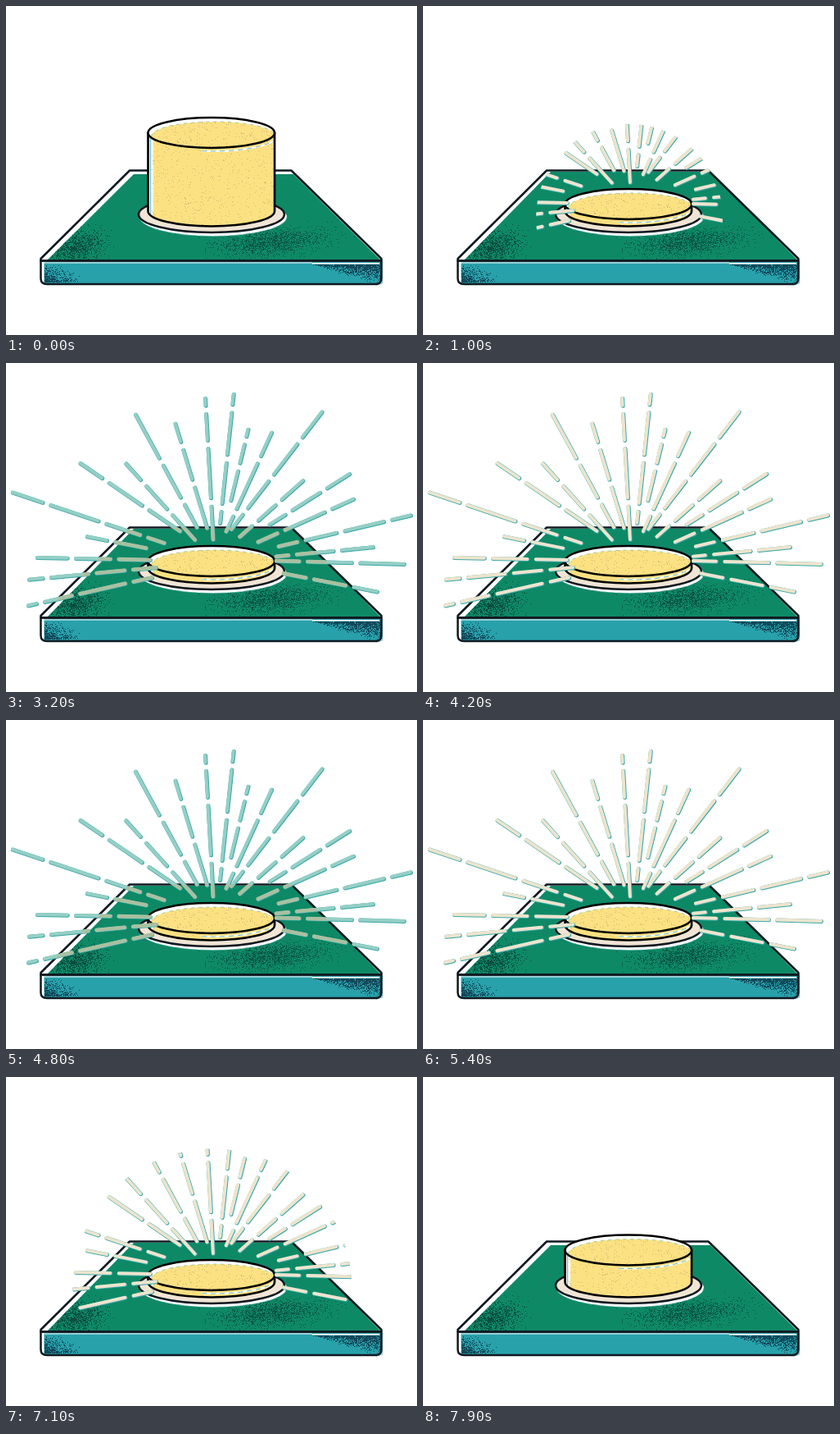
An HTML page with a canvas that plays this animation: 502 px wide and 401 px high, repeating every 8000 ms.

```html
<!DOCTYPE html>
<html lang="en">
<head>
<meta charset="utf-8">
<title>Push button</title>
<style>
html, body { margin: 0; width: 100%; height: 100%; overflow: hidden; background: #fff; }
canvas { display: block; width: 502px; height: 401px; }
</style>
</head>
<body>
<canvas id="stage" width="502" height="401"></canvas>
<script>
const ctx = document.getElementById('stage').getContext('2d');
const LOOP = 8000, UP = 154.5, DOWN = 241.5;
const INK = '#101820', GREEN = '#0e8966', TEAL = '#28a1ab', YELLOW = '#fbe182', CREAM = '#ede4cd';
const TAU = Math.PI * 2;

// outer x, y, inner x, y, then gap centres in percent from the outer end
const RAYS = [
  [6, 157, 195, 220, 23, 59, 86], [97, 211, 173, 226, 41], [36, 237, 178, 240, 31, 68],
  [26, 264, 185, 249, 15, 50, 78], [25, 296, 180, 261, 11, 39, 81], [89, 121, 214, 206, 26, 65],
  [145, 121, 232, 217, 26, 63], [157, 61, 234, 202, 42, 76], [206, 72, 246, 203, 22, 57],
  [243, 41, 253, 217, 9, 33, 73], [278, 36, 261, 197, 12, 50, 87], [296, 79, 274, 169, 17, 53],
  [325, 83, 268, 207, 28, 80], [387, 58, 274, 204, 25, 56, 84], [364, 142, 284, 213, 39, 75],
  [421, 134, 320, 198, 33, 75], [426, 165, 306, 219, 27, 75], [496, 185, 331, 224, 18, 53, 82],
  [450, 224, 328, 236, 37, 82], [488, 245, 328, 241, 38, 78], [455, 279, 337, 256, 30, 71]
];

let seed = 17;
function rnd() {
  seed = (seed * 16807) % 2147483647;
  return seed / 2147483647;
}
const bell = () => (rnd() + rnd() + rnd() + rnd() - 2) * 1.7;

function dots(n, place, size = 1) {
  const p = new Path2D();
  for (let i = 0; i < n; i++) {
    const [x, y] = place();
    p.rect(Math.round(x), Math.round(y), size, size);
  }
  return p;
}
const blob = (x, y, sx, sy, tilt = 0) => () => {
  const dx = bell() * sx;
  return [x + dx, y + bell() * sy + dx * tilt];
};

const shadeLeft = dots(1100, blob(84, 292, 17, 9, -0.15));
const shadeRight = dots(1500, blob(324, 287, 33, 8, -0.08));
const shadeRim = dots(170, () => {
  const a = rnd() * TAU, r = 1.05 + rnd() * 0.15;
  return [251 + Math.cos(a) * 92 * r, 252 + Math.sin(a) * 26 * r];
});
const shadeFrontRight = dots(1150, () => {
  const u = Math.sqrt(rnd());
  return [374 + u * 83, 315 + rnd() * rnd() * 26 * u];
});
const shadeFrontLeft = dots(420, () => [47 + rnd() * rnd() * 42, 336 - rnd() * rnd() * 22]);
const grain = dots(720, () => [177 + rnd() * 150, 134 + rnd() * 134]);

function poly(...pts) {
  const p = new Path2D();
  for (let i = 0; i < pts.length; i += 2) p.lineTo(pts[i], pts[i + 1]);
  p.closePath();
  return p;
}
function oval(x, y, rx, ry, a = 0, b = TAU) {
  const p = new Path2D();
  p.ellipse(x, y, rx, ry, 0, a, b);
  return p;
}
function fill(p, color) {
  ctx.fillStyle = color;
  ctx.fill(p);
}
function stroke(p, color, w) {
  ctx.strokeStyle = color;
  ctx.lineWidth = w;
  ctx.stroke(p);
}
function inside(p, draw) {
  ctx.save();
  ctx.clip(p);
  draw();
  ctx.restore();
}
function dashed(p, color, w, dash) {
  ctx.setLineDash(dash);
  stroke(p, color, w);
  ctx.setLineDash([]);
}

const outline = poly(151, 200.5, 348.5, 200.5, 458.5, 308, 458.5, 310.5, 42.5, 310.5, 42.5, 308);
const front = new Path2D();
front.moveTo(42.5, 310.5);
front.lineTo(458.5, 310.5);
front.lineTo(458.5, 332);
front.quadraticCurveTo(458.5, 339, 451, 339);
front.lineTo(50, 339);
front.quadraticCurveTo(42.5, 339, 42.5, 332);
front.closePath();

function drawBoard(pressed) {
  const y = pressed ? 202 : 205;
  const face = poly(156, y, 351, y, 458, 310, 50, 310);
  fill(outline, '#fff');
  fill(face, GREEN);
  inside(face, () => {
    fill(shadeLeft, '#0a4d3f');
    fill(shadeRight, '#0a5544');
    fill(shadeRim, '#2a7568');
  });
  fill(front, '#fff');
  inside(front, () => {
    ctx.fillStyle = TEAL;
    ctx.fillRect(46.5, 312, 413, 28);
    fill(shadeFrontRight, '#12495a');
    fill(shadeFrontLeft, '#12495a');
    ctx.fillStyle = '#fff';
    ctx.fillRect(46, 312.5, 328, 1);
    ctx.fillRect(374, 313, 82, 1.6);
  });
  stroke(poly(459.8, 312, 459.8, 338, 452, 340.4), TEAL, 0.7);
  stroke(outline, INK, 2.5);
  stroke(front, INK, 2.5);
}

function drawButton(top) {
  const cx = 250.8, rx = 77.3, ry = 18.5, low = 250;

  const glint = oval(253, 257, 90, 23.5);
  fill(glint, '#fff');
  dashed(glint, '#5bb9b3', 0.7, [5, 4]);
  const ring = oval(251, 254, 89, 22);
  fill(ring, '#f0e5d5');
  stroke(ring, INK, 2.6);

  const body = new Path2D();
  body.moveTo(cx + rx, top);
  body.lineTo(cx + rx, low);
  body.ellipse(cx, low, rx, ry, 0, 0, Math.PI);
  body.lineTo(cx - rx, top);
  body.closePath();
  fill(body, '#fff');
  inside(body, () => {
    ctx.fillStyle = YELLOW;
    ctx.fillRect(180, top, 150, 130);
    fill(grain, '#d5bd70');
    ctx.fillStyle = TEAL;
    ctx.fillRect(176.3, top, 0.8, 130);
    const rim = oval(cx + 2, top + 4, rx, ry, 0.1, 1.75);
    stroke(rim, '#fff', 2);
    dashed(rim, TEAL, 0.7, [6, 5]);
  });
  stroke(body, '#000', 2.6);

  const cap = oval(cx, top, rx, ry);
  fill(cap, '#fff');
  inside(cap, () => {
    const print = oval(cx + 3, top + 4.5, rx - 1, ry - 0.5);
    fill(print, YELLOW);
    dashed(print, '#63bdb5', 0.7, [4, 5]);
    inside(print, () => {
      ctx.translate(0, top - UP);
      fill(grain, '#cfb871');
    });
  });
  stroke(cap, '#000', 2.6);
}

const rays = new Path2D();
for (const [x1, y1, x2, y2, ...gaps] of RAYS) {
  const len = Math.hypot(x2 - x1, y2 - y1);
  const half = 5.2 / len, cap = 2 / len;
  let from = cap;
  const dash = (a, b) => {
    rays.moveTo(x1 + (x2 - x1) * a, y1 + (y2 - y1) * a);
    rays.lineTo(x1 + (x2 - x1) * b, y1 + (y2 - y1) * b);
  };
  for (const g of gaps) {
    dash(from, g / 100 - half);
    from = g / 100 + half;
  }
  dash(from, 1 - cap);
}

function drawRays(radius, teal) {
  inside(oval(252, 258, radius, radius), () => {
    ctx.lineCap = 'round';
    ctx.save();
    ctx.translate(0.5, 0.5);
    stroke(rays, '#38a8a8', 5);
    ctx.restore();
    stroke(rays, teal ? '#95cfc5' : CREAM, 4);
    if (teal) inside(outline, () => stroke(rays, '#a9c0a0', 4.6));
    ctx.lineCap = 'butt';
  });
}

function capHeight(t) {
  if (t < 500) return UP;
  if (t < 800) return [174, 205, 231][Math.floor((t - 500) / 100)];
  if (t < 7800) return DOWN;
  return t < 7900 ? 232 : 211;
}

function rayRadius(t) {
  const step = Math.floor(t / 100);
  if (step < 9 || step > 74) return 0;
  if (step < 15) return 79 + (step - 9) * 35;
  if (step < 70) return 300;
  return 79 + (74 - step) * 30.5;
}

function draw(t) {
  ctx.fillStyle = '#fff';
  ctx.fillRect(0, 0, 502, 401);
  ctx.lineJoin = 'round';
  drawBoard(t >= 500 && t < 7800);
  drawButton(capHeight(t));
  const r = rayRadius(t);
  const teal = t >= 1600 && t < 7000 && Math.floor(t / 200) % 2 === 0;
  if (r) drawRays(r, teal);
}

const start = performance.now();
function tick() {
  draw((performance.now() - start) % LOOP);
  requestAnimationFrame(tick);
}
tick();
</script>
</body>
</html>
```
